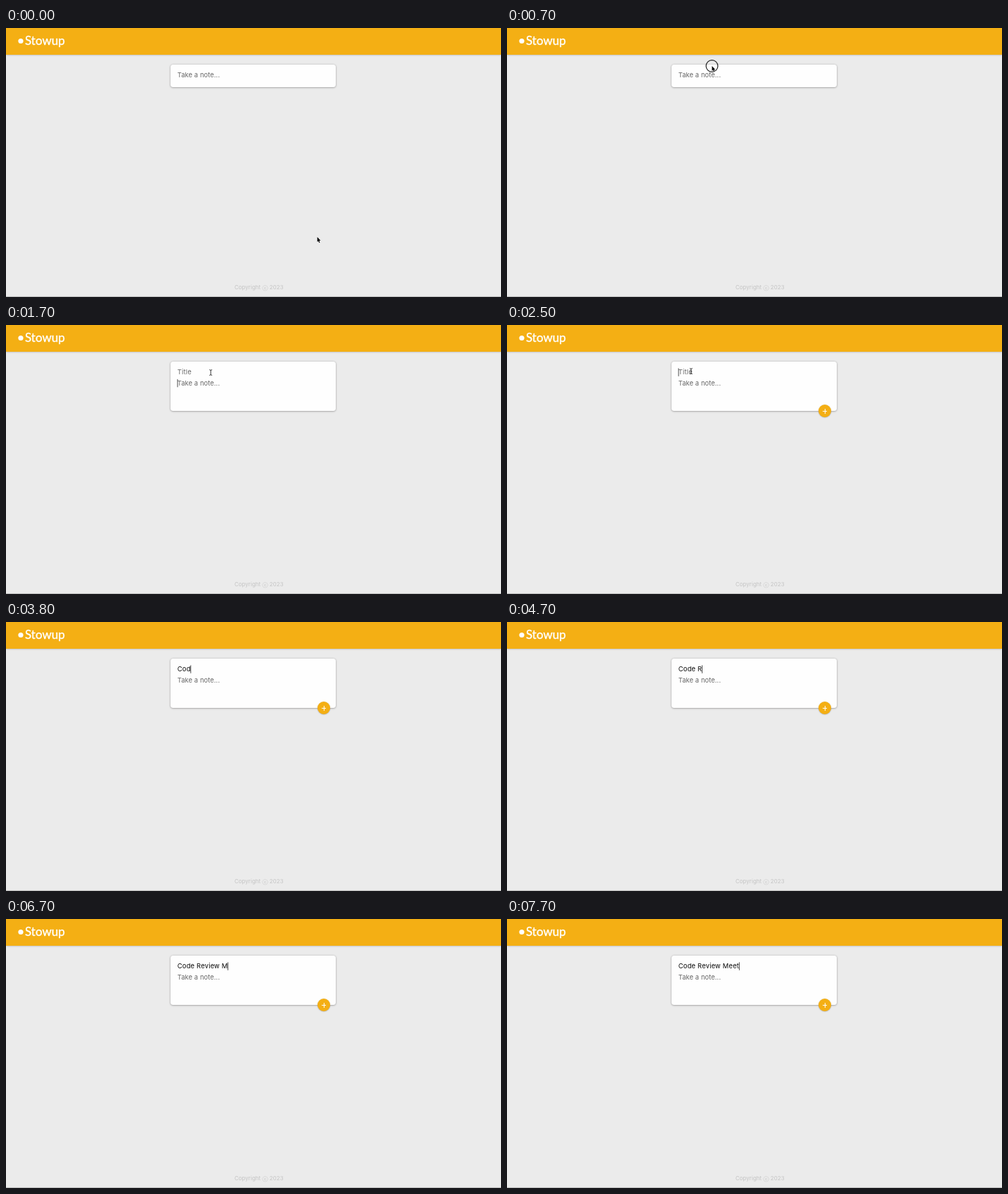
These frames come from a looping animation (704 by 382 pixels, 8 s). An HTML page:

```html
<!DOCTYPE html>
<html lang="en">
<head>
<meta charset="utf-8">
<title>Note app</title>
<style>
  html, body { margin: 0; width: 100%; height: 100%; overflow: hidden; background: #ebebeb; }
  #stage { position: relative; width: 704px; height: 382px; overflow: hidden; background: #ebebeb; }
  #stage > * { position: absolute; }
  header { left: 0; top: 0; width: 704px; height: 37.5px; background: #f4af14; box-shadow: 0 .3px 2.5px rgba(0, 0, 0, .35); }
  #card { left: 234px; top: 52px; width: 235px; height: 32px; border-radius: 3.5px; background: #fefefe;
    box-shadow: 0 .5px 2.5px rgb(138, 137, 137); }
  #fab { left: 443px; top: 113px; width: 18px; height: 18px; border-radius: 50%; background: #f4af14;
    box-shadow: 0 .5px 1.5px rgba(0, 0, 0, .3); }
  #fab::before, #fab::after { content: ""; position: absolute; left: 5.6px; top: 8.5px; width: 6.8px; height: 1px; background: #fff; }
  #fab::after { transform: rotate(90deg); }
  #edge { left: 0; top: 381px; width: 704px; height: 1px; background: #bcbcbc; }
  svg { left: 0; top: 0; }
  text { font: 9.4px Inter, "Open Sans", sans-serif; white-space: pre; }
  .hint { fill: #666; }
  .typed { fill: #0a0a0a; }
  #title { letter-spacing: .2px; }
  #note { letter-spacing: .08px; }
  #brand { font: 17px Lato, sans-serif; fill: #fff; stroke: #fff; stroke-width: .35; stroke-linejoin: round; }
  #foot { font-size: 7.83px; letter-spacing: .1px; fill: #c4c4c4; }
  #foot .mark { font-family: "DejaVu Sans", sans-serif; }
</style>
</head>
<body>
<div id="stage">
  <header></header>
  <div id="card"></div>
  <div id="fab"></div>
  <div id="edge"></div>
  <svg width="704" height="382" viewBox="0 0 704 382">
    <circle cx="21" cy="18.5" r="3.6" fill="#fff"/>
    <text id="brand" x="27" y="24.3">Stowup</text>
    <text id="title" x="243.8" y="70.4"></text>
    <text id="note" class="hint" x="243.8" y="70.4">Take a note...</text>
    <rect id="caret" width=".8" height="11.4" fill="#222"/>
    <text id="foot" y="371.3"><tspan x="325">Copyright</tspan><tspan class="mark" x="368.6" text-anchor="middle">ⓒ</tspan><tspan x="394.6" text-anchor="end">2023</tspan></text>
    <g id="pointer">
      <circle id="ring" r="8.4" fill="none" stroke="#222" stroke-width="1.2"/>
      <path id="arrow" d="M0 0V7L1.5 5.6 2.6 8.1 3.8 7.6 2.7 5.2H4.8Z" fill="#000" stroke="#fff" stroke-width=".6" paint-order="stroke"/>
      <path id="beam" d="M-1.9-3.9Q0-3.9 0-2.7Q0-3.9 1.9-3.9M0-2.7V2.7M-1.9 3.9Q0 3.9 0 2.7Q0 3.9 1.9 3.9" fill="none" stroke="#222" stroke-width=".9"/>
    </g>
  </svg>
</div>
<script>
  const LOOP = 8000, STEP = 100;
  const OPEN = 1700, TITLE = 2500, BLINK = 500;

  // Each word is typed at an even pace between its first and last key.
  const WORDS = [
    { text: "Code ", from: 3200, to: 4100 },
    { text: "Review ", from: 4500, to: 6000 },
    { text: "Meet", from: 6400, to: 7700 }
  ];
  const snap = t => Math.round(t / STEP) * STEP;
  const KEYS = WORDS.flatMap(({ text, from, to }) =>
    [...text].map((char, i) => ({ char, at: snap(from + (to - from) * i / (text.length - 1)) })));

  // The pointer glides to each stop; some glides end in a click.
  const HOME = { x: 442.7, y: 296.8 };
  const GLIDES = [
    { x: 293.5, y: 125, from: 0, to: 200 },
    { x: 291.5, y: 54, from: 300, to: 600, click: 700, release: 900 },
    { x: 291.2, y: 67.5, from: 1100, to: 1500, click: 1600, release: OPEN },
    { x: 261.8, y: 65.5, from: 2000, to: 2300, click: 2400, release: TITLE }
  ];

  const $ = id => document.getElementById(id);
  const [card, fab, title, note, caret, pointer, ring, arrow, beam] =
    ["card", "fab", "title", "note", "caret", "pointer", "ring", "arrow", "beam"].map($);
  const show = (el, on) => { el.style.visibility = on ? "visible" : "hidden"; };
  const clamp = p => Math.min(1, Math.max(0, p));
  const easeOut = p => 1 - (1 - p) ** 1.7;

  const zoom = fab.animate([{ transform: "scale(0)" }, { transform: "scale(1)" }],
    { duration: 225, easing: "cubic-bezier(.4,0,.2,1)", fill: "both" });
  zoom.pause();

  function drawForm(t) {
    const open = t >= OPEN;
    card.style.height = (open ? 70 : 32) + "px";
    show(fab, t > OPEN);
    zoom.currentTime = 225 * clamp((t - OPEN) / 225);
    note.setAttribute("y", open ? 85.9 : 70.4);

    const pressed = KEYS.filter(k => k.at <= t);
    const typed = pressed.map(k => k.char).join("");
    title.textContent = typed || (open ? "Title" : "");
    title.setAttribute("class", typed ? "typed" : "hint");

    const lastInput = typed ? pressed.at(-1).at : t < TITLE ? OPEN : TITLE;
    show(caret, open && t - lastInput < BLINK);
    caret.setAttribute("x", 243.6 + (typed ? title.getComputedTextLength() : 0));
    caret.setAttribute("y", t < TITLE ? 76.9 : 61.4);
  }

  function drawPointer(t) {
    let { x, y } = HOME;
    for (const g of GLIDES) {
      const p = easeOut(clamp((t - g.from) / (g.to - g.from)));
      x += (g.x - x) * p;
      y += (g.y - y) * p;
    }
    const visible = t < KEYS[0].at, overText = y > 58 && y < 78;
    pointer.setAttribute("transform", `translate(${x} ${y})`);
    show(ring, GLIDES.some(g => t >= g.click && t < g.release));
    show(arrow, visible && !overText);
    show(beam, visible && overText);
  }

  const start = performance.now();
  function tick() {
    const now = Math.max(0, performance.now() - start) % LOOP;
    const t = Math.floor(now / STEP) * STEP;
    drawForm(t);
    drawPointer(t);
    requestAnimationFrame(tick);
  }
  tick();
</script>
</body>
</html>
```
